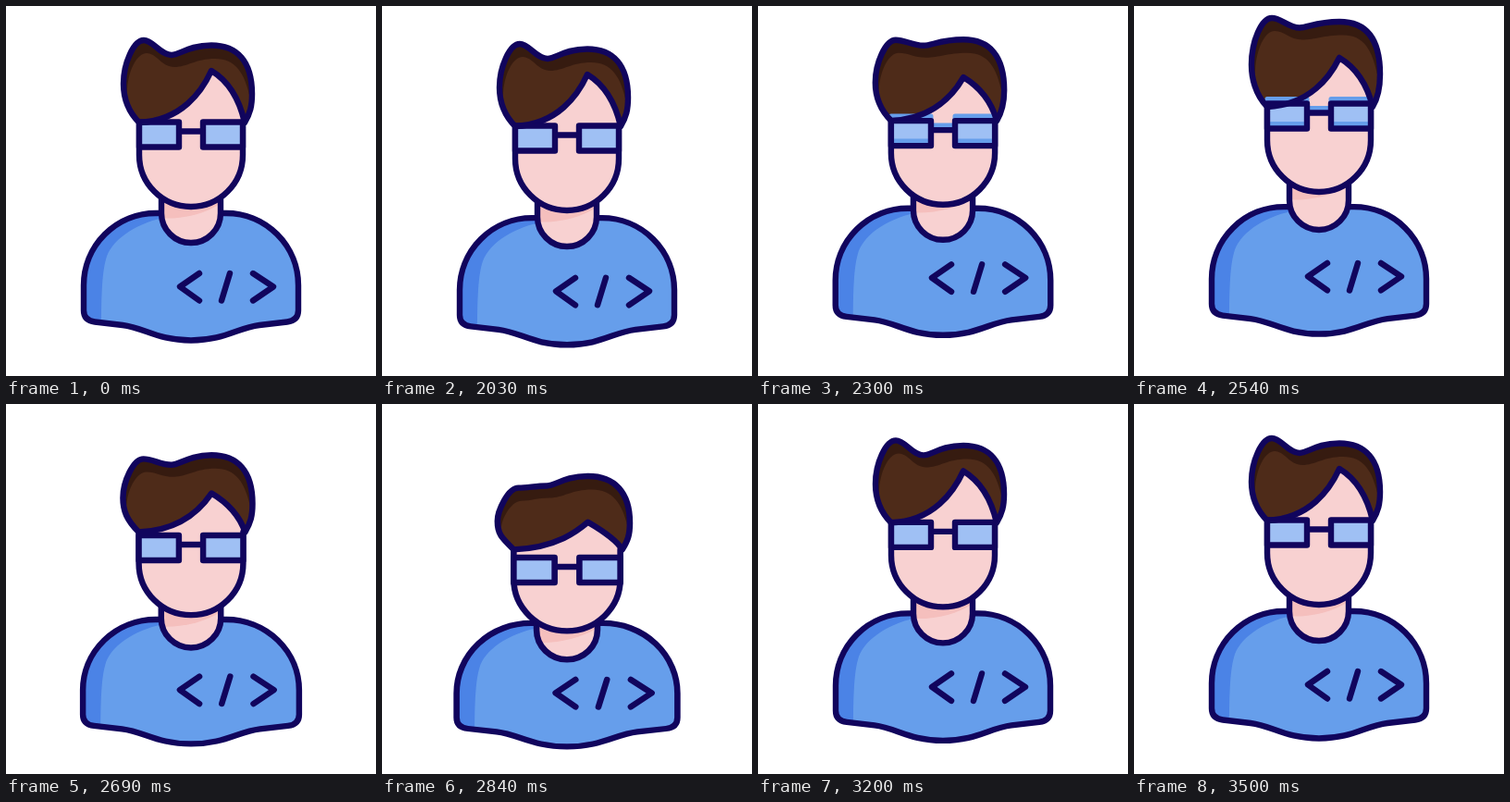
An HTML page that plays this animation: 400 px wide and 400 px high, repeating every 3530 ms.

```html
<!DOCTYPE html>
<html lang="en">
<head>
<meta charset="utf-8">
<title>Developer</title>
<style>
  html, body { margin: 0; width: 100%; height: 100%; overflow: hidden; background: #fff; }
  svg { display: block; width: 100%; height: 100%; }
  .line { fill: none; stroke: #11055d; stroke-width: 6.4; stroke-linecap: round; stroke-linejoin: round; }
  .shirt { fill: #669eeb; }
  .shirt-dark { fill: #4b83e6; }
  .skin { fill: #f8d1d1; }
  .skin-dark { fill: #f5bfbd; }
  .hair { fill: #4e2b19; }
  .hair-dark { fill: #361b10; }
  .lens { fill: #9fc0f4; }
  .glare { fill: none; stroke: #669eeb; stroke-width: 5; stroke-linejoin: round; }
</style>
</head>
<body>
<svg viewBox="0 0 400 400">
  <defs>
    <path id="torso" d="M162 224H238A78 78 0 0 1 316 302V329Q316 340 304 341.5L274 345C250 348 236 361.5 200 361.5S150 348 126 345L96 341.5Q84 340 84 329V302A78 78 0 0 1 162 224Z"/>
    <path id="throat" d="M168 194V224A32 32 0 0 0 232 224V194Z"/>
    <path id="frame" d="M144 125.5H187V152.5H144ZM213 125.5H256V152.5H213ZM187 135.5H213"/>
    <path id="hairShape"/>
    <clipPath id="torsoClip"><use href="#torso"/></clipPath>
    <clipPath id="throatClip"><use href="#throat"/></clipPath>
    <clipPath id="hairClip"><use href="#hairShape"/></clipPath>
  </defs>
  <g id="figure">
    <g id="body">
      <use href="#torso" class="shirt"/>
      <path class="shirt-dark" clip-path="url(#torsoClip)" d="M170 229C138 236 113 254 108 274C104 288 103 312 103 350H70V215H170Z"/>
      <use href="#torso" class="line"/>
    </g>
    <path id="code" class="line" d="M209 289L188 303.5L209 318.5M242 289L233 318.5M267 289L289 303.5L267 318.5"/>
    <g id="collar">
      <use href="#throat" class="skin"/>
      <g clip-path="url(#throatClip)">
        <path id="shade" class="skin-dark" d="M160 170H240V208C220 224 192 232 160 229Z"/>
      </g>
      <use href="#throat" class="line"/>
    </g>
    <path id="face" class="skin"/>
    <path id="jaw" class="line"/>
    <use href="#hairShape" class="hair-dark"/>
    <g clip-path="url(#hairClip)"><path id="hairLight" class="hair"/></g>
    <g id="lenses">
      <path class="lens" d="M144 125.5H187V152.5H144ZM213 125.5H256V152.5H213Z"/>
      <use id="glare" href="#frame" class="glare"/>
    </g>
    <use href="#hairShape" class="line"/>
    <use id="rims" href="#frame" class="line"/>
  </g>
</svg>
<script>
const LOOP = 3530, HOLD = 2000, STEP = 30;
const LEAD = 30; // the body moves slightly ahead of the head

// How far each part rises in a hop and sinks in a squash
const head = {
  crown: [25.5, 35], tuft: [24, 53], tip: [14, 57], fringe: [17, 31],
  glasses: [20, 40], chin: [16, 28], neck: [14, 20]
};
const torso = { shoulder: [8.2, 14], hem: [8.2, 9.7], code: [13, 9.7] };

const $ = id => document.getElementById(id);
const set = (id, name, value) => $(id).setAttribute(name, value);
const shift = (id, y) => set(id, "transform", `translate(0 ${y})`);

// Smooth pulse: 0 at start, 1 at peak, 0 at end
function pulse(t, start, peak, end) {
  if (t <= start || t >= end) return 0;
  const x = t < peak ? (t - start) / (peak - start) : (end - t) / (end - peak);
  return Math.sin(x * Math.PI / 2) ** 2;
}

const hop = t => 1.25 * pulse(t, 160, 440, 780);
const squash = t => 1.03 * (pulse(t, 40, 150, 380) + pulse(t, 560, 820, 1060));
const settle = t => 4 * pulse(t, 0, 30, 200)
  - 7 * pulse(t, 920, 1070, 1170) + 2.5 * pulse(t, 1120, 1210, 1460);

function pose(t) {
  const p = {
    wide: 3.3 * squash(t) ** 2,
    glare: 5 * Math.min(1, 4 * pulse(t, 200, 420, 700))
  };
  const move = (parts, time) => {
    for (const name in parts) {
      const [up, down] = parts[name];
      p[name] = down * squash(time) - up * hop(time) + settle(t);
    }
  };
  move(head, t);
  move(torso, t + LEAD);
  return p;
}

function drawHair(p) {
  const { crown: c, tuft: u, tip, fringe: f } = p;
  const dip = c - 0.8 * p.glare;
  const left = (u + f) / 2, right = (c + f) / 2, mid = (tip + f) / 2;
  set("hairShape", "d", `M144 ${126 + f}
    C131 ${113 + f} 127 ${98 + left} 127 ${84 + left}
    C127 ${62 + u} 138 ${37 + u} 149 ${37 + u}
    C159 ${37 + u} 167 ${53 + dip} 179 ${53 + dip}
    C188 ${53 + dip} 197 ${42.5 + c} 222 ${42.5 + c}
    C250 ${42.5 + c} 266 ${60 + c} 266 ${95 + right}
    C266 ${108 + right} 264 ${116 + f} 258 ${126 + f}
    C253 ${104 + mid} 242 ${82 + tip} 222 ${70 + tip}
    C212 ${92 + mid} 190 ${124 + f} 144 ${126 + f}Z`);
  set("hairLight", "d", `M131 ${90 + left}
    C133 ${66 + u} 143 ${51 + u} 152 ${51 + u}
    C163 ${51 + u} 168 ${66 + dip} 182 ${66 + dip}
    C196 ${66 + dip} 205 ${57 + c} 226 ${57 + c}
    C248 ${57 + c} 258 ${72 + c} 264 ${100 + right}
    L270 ${140 + f}H120Z`);
}

function draw(t) {
  const p = pose(t);

  set("figure", "transform", `translate(200 0) scale(${1 + p.wide / 116} 1) translate(-200 0)`);
  const tall = 1 + (p.hem - p.shoulder) / 137;
  set("body", "transform", `translate(0 ${224 + p.shoulder}) scale(1 ${tall}) translate(0 -224)`);
  shift("code", p.code);
  shift("collar", p.neck);
  shift("shade", p.chin - p.neck - 0.8 * p.glare);

  const cheek = 161 + p.chin;
  const outline = top => `M144 ${top}V${cheek}A56 56 0 0 0 256 ${cheek}V${top}`;
  set("jaw", "d", outline(126 + p.fringe));
  set("face", "d", outline(72 + p.tip));

  drawHair(p);
  shift("lenses", p.glasses);
  shift("rims", p.glasses);
  shift("glare", -p.glare);
}

function tick() {
  const t = performance.now() % LOOP - HOLD;
  draw(Math.max(0, Math.floor(t / STEP) * STEP));
  requestAnimationFrame(tick);
}
tick();
</script>
</body>
</html>
```
